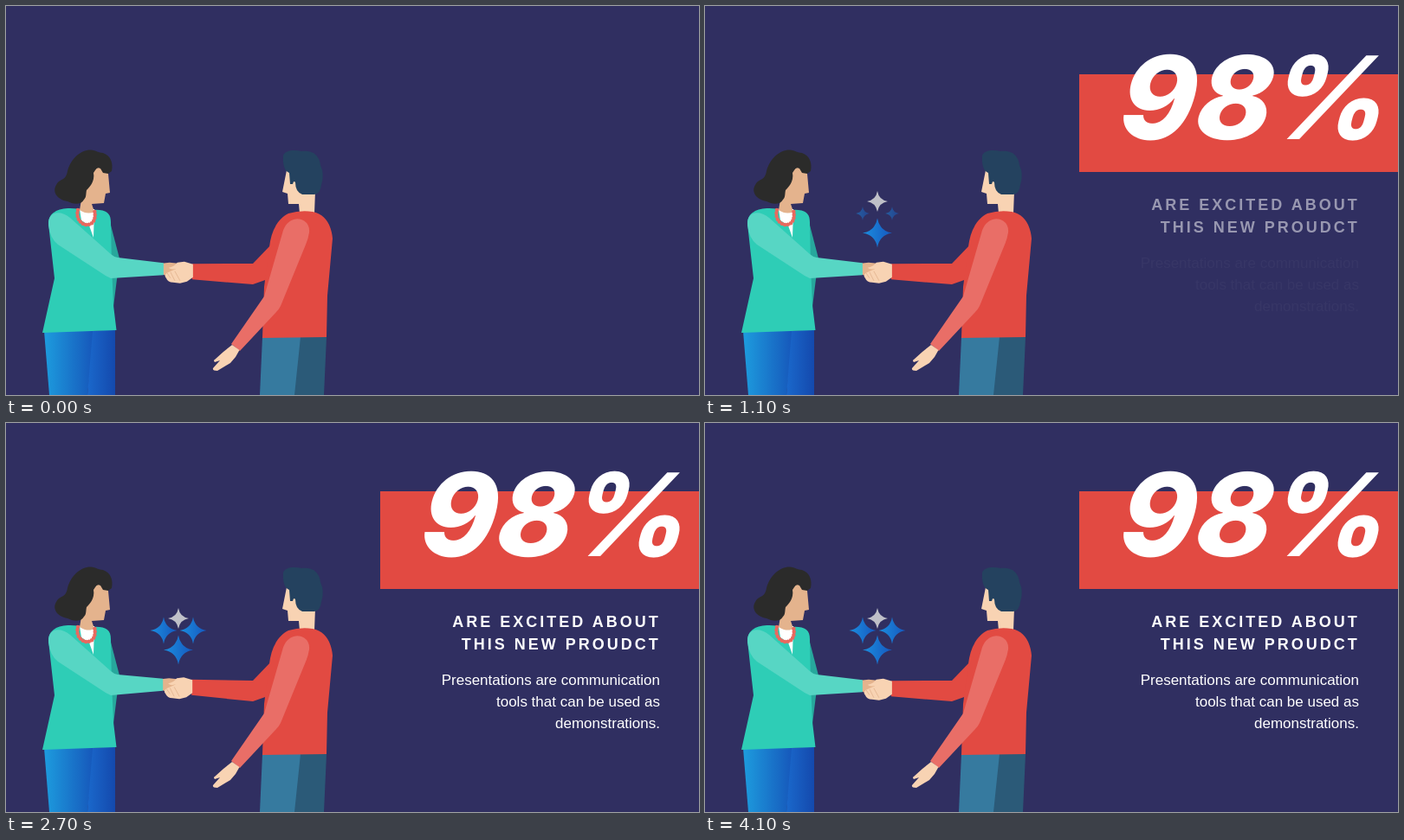
Write an HTML page that moves like this. It is 800 px wide and 450 px high and loops after 4200 ms.

```html
<!DOCTYPE html>
<html lang="en">
<head>
<meta charset="utf-8">
<style>
  html, body { margin: 0; width: 100%; height: 100%; overflow: hidden; background: #302f61; }
  svg { display: block; width: 800px; height: 450px; }
  text { fill: #fff; text-anchor: end; font-family: "Liberation Sans", Arial, sans-serif; }
  #percent text { font: italic 800 133px Inter, "Open Sans", sans-serif; text-anchor: middle; }
  #heading { font-weight: bold; font-size: 18px; letter-spacing: 3px; }
  #body { font-size: 17px; }
</style>
</head>
<body>
<svg viewBox="0 0 800 450">
  <defs>
    <linearGradient id="jeans"><stop stop-color="#1d9cde"/><stop offset="1" stop-color="#1656ba"/></linearGradient>
    <linearGradient id="jeansDark"><stop stop-color="#1a68cb"/><stop offset="1" stop-color="#1449ad"/></linearGradient>
    <linearGradient id="spark"><stop stop-color="#1b8ee0"/><stop offset="1" stop-color="#1658be"/></linearGradient>
    <path id="star" d="M0-1Q.14-.14 1 0Q.14.14 0 1Q-.14.14-1 0Q-.14-.14 0-1Z"/>
  </defs>

  <rect id="banner" x="432" y="79" width="368" height="113" fill="#e24a42"/>
  <g id="percent">
    <text transform="translate(0 105) skewX(-5.500)" x="524.500 612.500 723" y="48.500">98%</text>
  </g>
  <g id="heading">
    <text x="755.700" y="236">ARE EXCITED ABOUT</text>
    <text x="755.700" y="262">THIS NEW PROUDCT</text>
  </g>
  <g id="body">
    <text x="755" y="303">Presentations are communication</text>
    <text x="755" y="328">tools that can be used as</text>
    <text x="755" y="353">demonstrations.</text>
  </g>
  <g id="stars"></g>

  <g id="woman">
    <path fill="url(#jeans)" d="M44 376H102L94 450H50Z"/>
    <path fill="url(#jeansDark)" d="M100 376L126 374V450H94Z"/>
    <path fill="#27a79c" d="M119 246L131 292L124 348L118 320Z"/>
    <path fill="#2ecdb6" d="M49 252C49 239 60 234 74 234L108 236C118 237 121 242 121 250L122 300L124 346L127.500 375L42 378L56 315Z"/>
    <path fill="#fff" d="M85 235H102L101 268L96 254L87 248Z"/>
    <path fill="#e4b38d" d="M100 186H116L118 194L120 216L115 217L113 228L99 229L102 238Q94 242 85 236L87 224Z"/>
    <path fill="#2b2b2a" d="M71 191C75 176 87 166 98 166.500C104 167 107 170 112 170C121 173 124 182 122 191L118 194L112 193L109 188Q105 186 103 190L101 193C103 203 96 210 93 213C92 218 93 221 90 224C86 231 77 229 71 226C59 224 53 215 58 207C62 199 69 203 71 191Z"/>
    <path fill="none" stroke="#e8695f" stroke-width="4.500" stroke-linecap="round" stroke-dasharray="0 3.600" d="M83 236C80 248 89 254 95 253C102 252 104 244 102 236"/>
  </g>

  <path id="farSleeve" fill="#e24a42"/>
  <g id="hands">
    <path fill="#e4b38d" d="M180 298L189 297L199 298L208 306L202 317L190 315L180 310Z"/>
    <path fill="#f8d3b3" d="M216 299L206 296L198 297Q194 302 188 303Q190 306 197 304L186 309Q182 312 185 315Q187 320 193 320L201 321L209 319L216 314Z"/>
    <path fill="none" stroke="#dfae89" stroke-width=".700" d="M186 309L190 315M190 308L195 318M195 307L201 318"/>
  </g>
  <path id="nearSleeve" fill="#57d6c4"/>

  <g id="man">
    <path fill="#367a9f" d="M296 383H345L337 450H293Z"/>
    <path fill="#2b5a78" d="M340 383H370L367 450H333Z"/>
    <path fill="#f8d3b3" d="M324 190L319 215L325 217L326 229L338 229L339 240H356L357 214L334 190Z"/>
    <path fill="#24425f" d="M320 173C322 167 332 166 341 168C354 166 362 173 363 184Q368 195 364 207Q363 217 356 218L342 218Q334 215 334 204Q332 201 331 206L328 206L327 193Q319 190 320 173Z"/>
    <path fill="#e24a42" d="M326 240Q340 236 354 238C370 241 376 256 377 269L371 335L370 383L296 384L298 325L304 279C306 260 314 246 326 240Z"/>
    <path fill="#e96e67" d="M319 263C322 250 332 244 341 247Q351 251 350 262Q349 269 346 276L317 347Q315 351 312 354L270 399L260 391L298 336Z"/>
    <path fill="#f8d3b3" d="M261 392L269.500 398L265 406L259 413L244 422Q238 422 239 419L247 410L241 412Q239 410 241 409L251 400Z"/>
  </g>
</svg>
<script>
  const LOOP = 4200, STEP = 100;
  const $ = id => document.getElementById(id);
  const progress = (t, start, end) => Math.min(1, Math.max(0, (t - start) / (end - start)));
  const easeOut = p => 1 - (1 - p) ** 3;
  const slide = (id, x) => $(id).setAttribute("transform", `translate(${x} 0)`);

  const stars = [
    { x: 199, y: 226, r: 12, start: 650, end: 1000, fill: "#bfc0c8" },
    { x: 199, y: 262.5, r: 17, start: 750, end: 1100, fill: "url(#spark)" },
    { x: 182, y: 240, r: 15.5, start: 950, end: 1250, fill: "url(#spark)" },
    { x: 216, y: 240, r: 15.5, start: 950, end: 1250, fill: "url(#spark)" }
  ];
  $("stars").innerHTML = stars.map(s => `<use href="#star" fill="${s.fill}"/>`).join("");

  function draw(t) {
    slide("banner", 370 * (1 - easeOut(progress(t, 0, 600))));
    slide("percent", 340 * (1 - easeOut(progress(t, 230, 1080))));
    $("heading").setAttribute("opacity", progress(t, 850, 1350));
    $("body").setAttribute("opacity", progress(t, 1085, 1560));
    stars.forEach((s, i) => {
      const grown = progress(t, s.start, s.end), use = $("stars").children[i];
      use.setAttribute("transform", `translate(${s.x} ${s.y}) scale(${s.r * grown})`);
      use.setAttribute("opacity", grown);
    });

    // Both forearms follow the clasped hands.
    const lift = 1.25 * (1 - Math.cos((t - 50) / 500 * 2 * Math.PI));
    $("hands").setAttribute("transform", `translate(${-lift / 2} ${-lift})`);
    $("nearSleeve").setAttribute("d", `M49 252C49 237 63 236 74 245L121 287Q124 290 129 291
      L${182 - lift / 2} ${297.5 - lift}V${311.5 - lift}L121 315L115 312L60 276Q50 268 49 252Z`);
    $("farSleeve").setAttribute("d", `M308 274L285 298L${215 - lift / 2} ${298.5 - lift}
      V${316.5 - lift}L285 322L302 316Z`);
  }

  function tick() {
    draw(Math.floor(performance.now() % LOOP / STEP) * STEP);
    requestAnimationFrame(tick);
  }
  tick();
</script>
</body>
</html>
```
